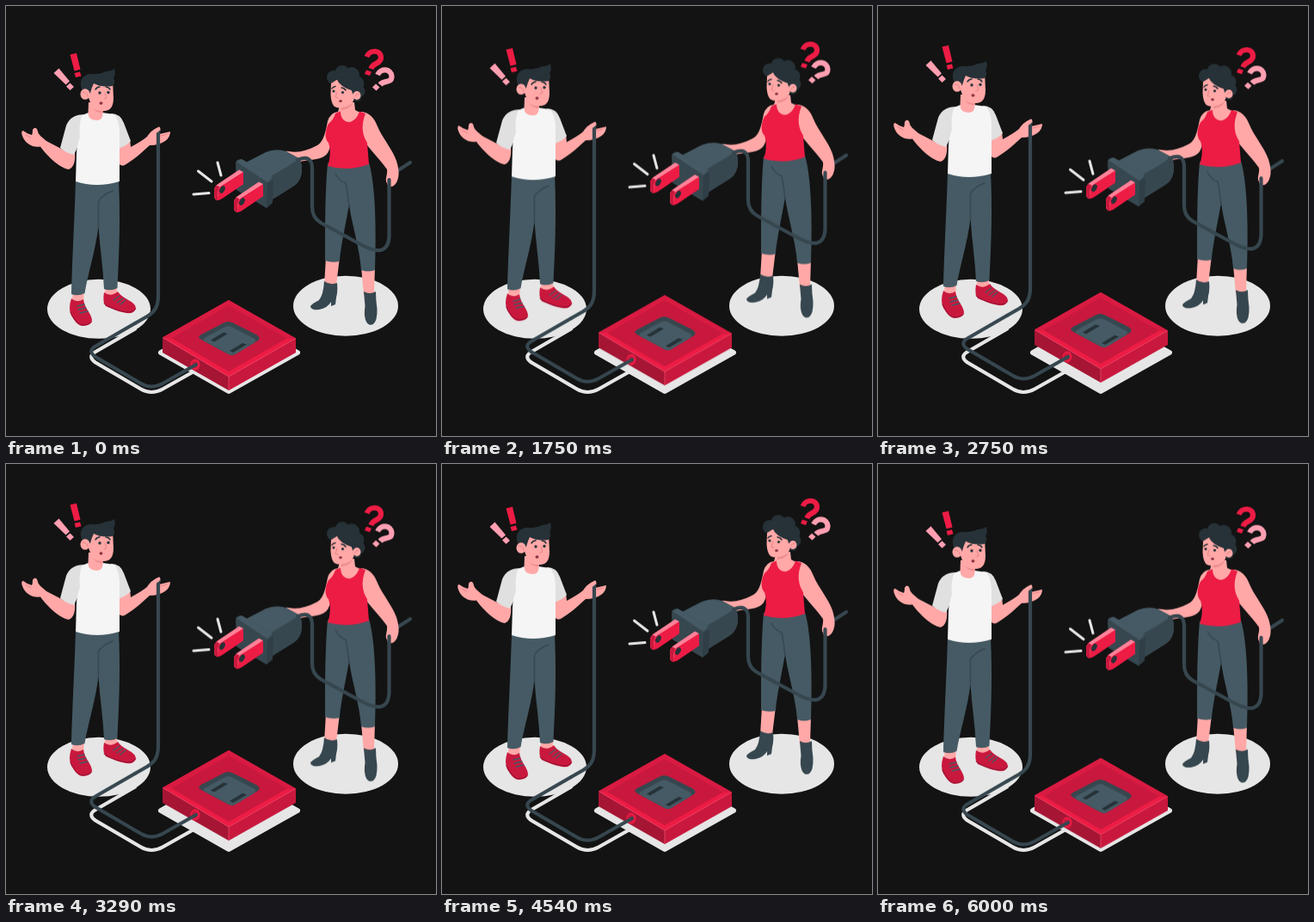
An HTML page for the animation above (6040 ms loop, 500 px wide and 500 px high).

```html
<!DOCTYPE html>
<html lang="en">
<head>
<meta charset="utf-8">
<title>Unplugged</title>
<style>
  html, body { margin: 0; width: 100%; height: 100%; overflow: hidden; background: #131313; }
  svg { display: block; width: 100vw; height: 100vh; }
  .floor { fill: #e6e6e6; }
  .skin { fill: #ffa8a7; }
  .hair { fill: #263238; }
  .slate { fill: #455a64; }
  .deep { fill: #37474f; }
  .red { fill: #ed1c45; }
  .crimson { fill: #c9183d; }
  .pink { fill: #ff9fb2; }
  .white { fill: #f5f5f5; }
  .grey { fill: #e0e0e0; }
  .line { fill: none; stroke-linecap: round; stroke-linejoin: round; }
  .cable { stroke: #37474f; stroke-width: 4.2; }
  .fold { stroke: #37474f; stroke-width: 1.4; }
  .brow { stroke: #263238; stroke-width: 1.5; }
  .crease { stroke: #e88388; stroke-width: 1; }
  .spark { stroke: #e6e6e6; stroke-width: 3; }
  .mark { fill: none; stroke-width: 6.2; }
</style>
</head>
<body>
<svg viewBox="0 0 500 500">
  <defs>
    <path id="floorCable" d="M150 369L105 395Q94 401 104 408L157 439Q169 446 182 439L221 417"/>
    <g id="prong">
      <path class="red" d="M242 213Q243 209 247 207L271 191 276 194V207L251 224Q243 229 242 221Z"/>
      <path fill="#ff8299" d="M245 208L271 190.500 276 193 250 209.500Q247 212 246 225Q243 226 242 221V213Z"/>
      <path class="red" d="M247 213Q248 211 250 210L276 194V207L251 224Q247 226 246.500 222Z"/>
      <path class="crimson" d="M242 213Q243 210 245 208.500L248.500 210.500Q246 213 246 225Q243 226 242 221Z"/>
      <ellipse class="hair" cx="251.500" cy="213.500" rx="2.800" ry="4.600" transform="rotate(28 251.500 213.500)"/>
    </g>
  </defs>

  <!-- ground -->
  <g class="floor">
    <ellipse cx="108" cy="352.300" rx="60" ry="34.500"/>
    <ellipse cx="395" cy="348.700" rx="61" ry="35"/>
    <path d="M259 358L339 403 259 448 180 403Z" stroke="#e6e6e6" stroke-width="6" stroke-linejoin="round"/>
    <use href="#floorCable" y="6.500" class="line" stroke="#e6e6e6" stroke-width="4.200"/>
  </g>

  <!-- man and socket -->
  <g id="man">
    <g class="red">
      <path d="M74.500 56.500L82 54.700 86.500 73.700 79.500 75.500Z"/>
      <path d="M79.500 78L86 76.500 87.500 81.500 81 83Z"/>
    </g>
    <g class="pink">
      <path d="M55.500 78L61.500 72.500 74 87.500 69.500 91.500Z"/>
      <path d="M70 93.500L74.500 89.500 79 94 74.500 98Z"/>
    </g>

    <!-- legs and shoes -->
    <path class="skin" d="M78 330H91L90 345Q83 348 77 343ZM115 325H129L129 336Q122 340 115 336Z"/>
    <path class="crimson" d="M76 340Q82 346 90 341C91 351 99 357 100 365Q100 371 90 372C83 372 80 366 76 360Q72 352 76 340Z"/>
    <path class="crimson" d="M114 333Q122 339 130 332C135 340 146 342 150 348Q153 354 146 357C136 358 126 353 116 349Q112 344 114 333Z"/>
    <path class="line" stroke="#8e1030" stroke-width="1" d="M75 356Q80 368 88 371 97 371 99.500 367M114 346Q122 352 135 355 147 358 151 352"/>
    <path class="line" stroke="#455a64" stroke-width="1.300" d="M83 349L91 347M84 353L93 351M86 357L95 355M125 342L132 337M129 345L136 340M133 347L139 342"/>
    <path class="slate" d="M81 202H131C133 245 132 280 129.500 328Q122 332 114 329C113 305 109 280 107.500 256C104 285 96 308 91.500 334Q84 338 76 335C77 295 80 240 81 202Z"/>
    <path class="line fold" d="M124 215Q113 219 107.500 227V257"/>

    <!-- arms -->
    <path class="skin" d="M64 164L80 169C81 180 79 188 73 190C61 188 46 172 40 163.500C31 165 22 160 19 151Q17 145 20 145Q25 149 30 150Q31 148 31 144Q33 140 36 143Q37 148 40 151L47 157 70 169Z"/>
    <path class="skin" d="M131 160L144 154 145 164Q158 157 164 152 168 145 178 140.500 181 142 178 149L191 146Q191 153 185 157 178 162 167 162C158 170 150 178 138 185Q132 187 131 181Z"/>
    <path class="line crease" d="M180 151L187 149M23 150L29 153"/>

    <!-- shirt -->
    <path class="grey" d="M92 126Q75 126 70 139L63 165Q70 171 79 173L90 150ZM122 125Q133 125 137 136L145 157Q140 163 130 166L124 145Z"/>
    <path class="white" d="M96 124Q90 126 88 128 84.500 139 86 152 82 164 82 172L81 204Q105 212 132 204V145Q131 132 126 126L112 124Z"/>
    <path class="skin" d="M96 112H113L112.500 125Q113 132 106 133 96 133 95.500 125Z"/>
    <path fill="#ee8d90" d="M101 119Q107 123 113 122V124Q106 125 101 119Z"/>

    <!-- head -->
    <path class="skin" d="M95 90L124 86 125 107Q125 121 115 122 103 123 98 112L95 104Z"/>
    <path class="hair" d="M89 99C83 86 91 78 101 79Q109 80 116 76 122 76 126 73 128 80 125 84 128 88 124 93 111 95 102 90 100 94 98 101L95 103Z"/>
    <ellipse class="skin" cx="92" cy="102.500" rx="5.500" ry="6.300"/>
    <path class="line crease" d="M89 100Q94 100 95 105M115 101L117 107 114 108"/>
    <path class="line brow" d="M104 97Q106 94 109 94M116 94Q119 94 121 97"/>
    <circle class="hair" cx="109" cy="101" r="1.700"/>
    <circle class="hair" cx="119" cy="100.500" r="1.700"/>
    <ellipse cx="110.500" cy="113" rx="2" ry="1.700" fill="#8a3545"/>

    <!-- socket -->
    <path fill="#a61534" d="M182 385L259 430V447L182 403Z"/>
    <path class="crimson" d="M337 386L259 430V447L337 403Z"/>
    <path class="red" d="M259 342L337 386.500 259 431 182 385.500Z"/>
    <path fill="#d91b42" d="M259 342L337 386.500 328 387 259 348 191 386 182 385.500Z"/>
    <path class="crimson" d="M259 348L327 386.500 259 425 192 386Z"/>
    <path class="line" stroke="#ef5271" stroke-width=".700" d="M259 431V446M183 386L259 431 336 387"/>
    <g transform="translate(0 1)">
      <path class="deep" d="M253 367.500Q258 364.500 264 367.500L291 381Q297 385 293 388L268 403Q263 407 257 403L228 387.500Q221 384 227 381Z"/>
      <path class="slate" d="M253 373Q258 370 263 372.500L289 386Q291 388 289 390.500L268 403Q263 407 257 403L230 388.500Q228 387 231 385Z"/>
      <path class="hair" d="M238 387.500L253 378.500 258 380 242 389.500ZM260 400L275 391 280 392.500 264 402Z"/>
    </g>
    <ellipse class="red" cx="220" cy="417" rx="5.500" ry="6.500"/>
    <ellipse class="crimson" cx="219.500" cy="417" rx="3.500" ry="4.300"/>

    <path class="line cable" d="M177 144V337C177 351 172 356 164 361L150 369"/>
    <use href="#floorCable" class="line cable"/>
    <path class="skin" d="M168 147Q172 143 178 140.500 180 142 178.500 145L172 150Z"/>
  </g>

  <!-- woman and plug -->
  <g id="woman">
    <g class="mark" stroke="#ed1c45">
      <path d="M419.500 59C423 50 436 51 436 60C436 68 427 65 424.500 73"/>
    </g>
    <path class="red" d="M419 74.500L425 76.500 423 81 417 79Z"/>
    <g class="mark" stroke="#ff9fb2">
      <path d="M432 80C436 71.500 448 73 448.500 82C448 91 440 85 435 91.500"/>
    </g>
    <path class="pink" d="M430 90.500L434.500 94.500 430.500 98.500 426 94.500Z"/>

    <!-- legs and boots -->
    <path class="skin" d="M372 292H388L384 325H370ZM413 303H429L428 336H416Z"/>
    <path class="deep" d="M370 320Q377 325 385 322 386 332 384 339L383 347 378 349V344Q374 351 364 353 354 354 354 349 356 346 364 342 369 336 370 320Z"/>
    <path class="deep" d="M416 332Q423 336 430 332 430 342 431.500 352 432 366 427 370 421 373 418 365 416 358 417.500 349Z"/>
    <path class="slate" d="M374 183L422 182C429 205 431 255 429 307Q421 310 413 307C411 280 401 250 399 230C396 250 389 280 388 297Q379 299 371 296C371 260 371 215 374 183Z"/>
    <path class="line fold" d="M383 195Q388 204 395 206 397 215 399 234"/>

    <!-- cable tail, arms -->
    <path class="line cable" d="M445 206Q445 198 453 193L470 182"/>
    <path class="skin" d="M386 123Q377 124 374 134C371 150 368 160 360 163C350 168 340 171 329 169Q321 168 324 173C328 177 334 181 342 181C355 178 369 179 374 171Q378 165 378 150Z"/>
    <path class="skin" d="M410 123C421 122 428 129 432 140C438 154 449 166 454 180C458 193 457 200 454 205C450 211 444 212 443 206C440 202 444 196 443 190C433 176 420 164 413 152Z"/>

    <!-- plug -->
    <path class="slate" d="M275 184L302 170Q314 165 326 169L339 176Q344 180 344 190 344 203 335 209L308 226Z"/>
    <path class="deep" d="M308 198L330 185Q339 178 342 179 344 184 344 192 343 203 335 209L309 225Z"/>
    <path class="deep" d="M267 182Q268 178 274 178L308 198Q311 200 311 204L310 229 303 235 268 214Z"/>
    <path class="hair" opacity=".35" d="M304 206L311 202 310 229 303 235Z"/>
    <path class="slate" d="M268 181L274 178 310 199 304 205Z"/>
    <use href="#prong"/>
    <use href="#prong" x="23" y="14"/>
    <path class="line spark" d="M246 182L250 197M223.500 192L239 204M218 219L236 217.500"/>

    <!-- cable -->
    <path class="line cable" d="M339 179Q356 172 356 189V234Q356 246 366 252L412 277Q444 295 445.500 268V202"/>
    <path class="skin" d="M444 191L452 190 455 203Q452 210 448 210L449 200 446 199Z"/>

    <!-- top -->
    <path class="skin" d="M385 127L389 112H405L406 121 416 126 408 142H388Z"/>
    <path class="red" d="M383 125L389 122.500C389 131 394 135 399 135C405 134 409 129 411 122.500L418 125C412 140 415 151 420 159L422 184Q398 193 374 186C377 178 378 168 375 159C370 154 371 144 375 137Q381 132 383 125Z"/>

    <!-- head -->
    <g class="hair">
      <circle cx="381" cy="83" r="8"/>
      <circle cx="391" cy="77.500" r="8.500"/>
      <circle cx="402" cy="80" r="9"/>
      <circle cx="408" cy="90" r="8.500"/>
      <circle cx="410" cy="99" r="7.500"/>
      <circle cx="408" cy="106" r="5"/>
      <path d="M377 82H406L412 104 394 108 378 92Z"/>
    </g>
    <path class="skin" d="M378 90L386 85Q391 94 402 98L405 106Q404 115 396 117 388 120 382 117 378 113 377.500 103Z"/>
    <ellipse class="skin" cx="408" cy="104" rx="4.500" ry="5"/>
    <path class="hair" d="M384 84Q388 94 402 98L403 102 406 98 402 83Z"/>
    <path fill="#ee8d90" d="M390 118Q398 118 403 112 401 120 390 121Z"/>
    <path class="line crease" d="M406 105Q407 102 410 102M385 100L383 106 386 107"/>
    <path class="line brow" d="M379 96Q380 94 383 93.500M390 95Q393 95 395 98"/>
    <circle class="hair" cx="381" cy="99" r="1.600"/>
    <circle class="hair" cx="391.500" cy="100.500" r="1.600"/>
    <ellipse cx="389" cy="110.500" rx="1.900" ry="1.600" fill="#8a3545"/>
  </g>
</svg>
<script>
  const LOOP = 6040;
  const RISE = 10;

  // Steady rise and fall; the woman bobs twice for each bob of the man.
  function bob(id, duration) {
    const stops = [0, -RISE, 0].map(y => ({ transform: `translateY(${y}px)` }));
    const motion = document.getElementById(id).animate(stops, { duration, iterations: Infinity });
    motion.startTime = document.timeline.currentTime;
  }

  bob("man", LOOP);
  bob("woman", LOOP / 2);
</script>
</body>
</html>
```
